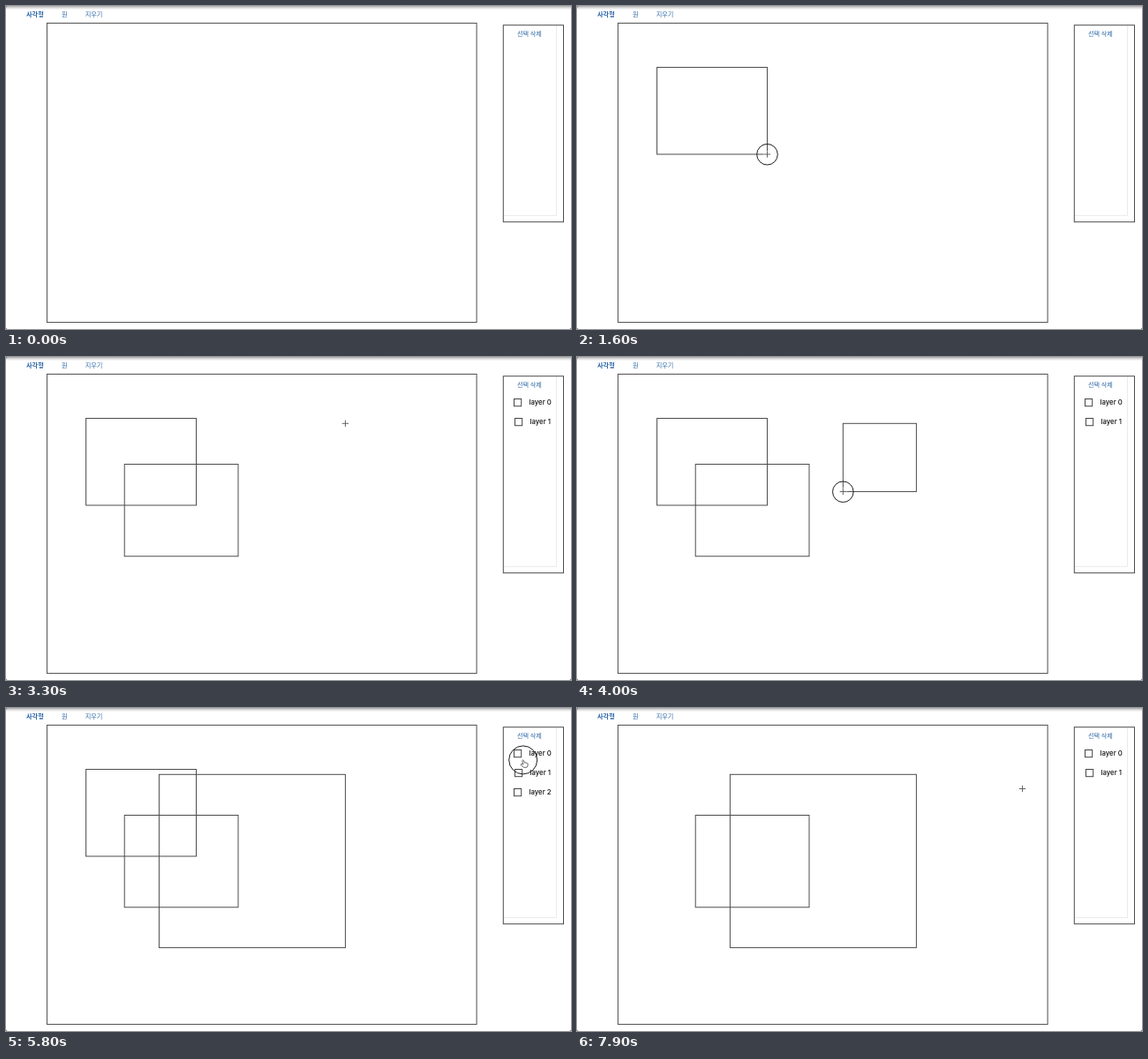
An HTML page that plays this animation: 640x366 px, repeating every 8000 ms.

```html
<!DOCTYPE html>
<html>
<head>
<meta charset="utf-8">
<title>Layer drawing</title>
<style>
html, body { margin: 0; width: 100%; height: 100%; overflow: hidden; background: #fff; }
svg { display: block; width: 640px; height: 366px; }
.ko { font: 400 7.15px "Noto Sans CJK KR", "Noto Sans CJK", sans-serif; fill: #2f69a6; }
.active { font-weight: 600; fill: #2460a4; }
.layer { font: 500 7.8px Inter, Roboto, sans-serif; fill: #111; }
.line { fill: none; stroke: #4c4c4c; }
.picked { stroke: #34345a; stroke-width: 1.6; }
.box { fill: none; stroke: #444; }
.ring { fill: none; stroke: #1c1c1c; }
.hand, .arrow { stroke-width: .8; stroke-linejoin: round; }
.hand { fill: #fff; stroke: #333; }
.arrow { fill: #111; stroke: #fff; }
</style>
</head>
<body>
<svg viewBox="0 0 640 366">
  <defs>
    <linearGradient id="shade" x2="0" y2="1">
      <stop stop-color="#a6a6a6"/><stop offset=".45" stop-color="#dedede"/><stop offset="1" stop-color="#fff"/>
    </linearGradient>
  </defs>
  <rect width="640" height="4.5" fill="url(#shade)"/>
  <path d="M0 364.5V366H1.5ZM640 364.5V366H638.5ZM0 0H1.5L0 2Z" fill="#777"/>
  <rect class="line" x="46.4" y="19.4" width="486.7" height="339"/>
  <path d="M623.5 22V237.5H563" fill="none" stroke="#ebebeb"/>
  <rect class="line" x="563.3" y="21.7" width="68.2" height="223"/>
  <rect id="hover" x="571" y="24" width="44" height="15" rx="2" fill="#1976d2" opacity="0"/>
  <text class="ko active" x="23" y="12">사각형</text>
  <text class="ko" x="63" y="12">원</text>
  <text class="ko" x="89.7" y="12">지우기</text>
  <text class="ko" x="579" y="33.6">선택 삭제</text>
  <g id="scene"></g>
</svg>
<script>
const LOOP = 8000, STEP = 100, TRAVEL = 350;
const CHECK = 6000, DELETE = 7000;
const scene = document.getElementById('scene');
const hover = document.getElementById('hover');

const moves = [], shapes = [], presses = [];
let spot = { x: 330, y: 385 };

function glide(from, to, x, y) {
  moves.push({ from, to, a: spot, b: { x, y } });
  spot = { x, y };
}

function press(from, to) {
  presses.push({ from, to });
}

// Travel to one corner, then drag to the opposite one
function dragBox(leave, down, arrive, release, a, b) {
  glide(leave, leave + TRAVEL, ...a);
  glide(down, arrive, ...b);
  press(down - 40, release);
  shapes.push({ a, b, down, arrive, release });
}

glide(100, 900, 36, 13);
dragBox(1050, 1400, 1600, 1700, [90.6, 69.5], [215.5, 168]);
dragBox(1800, 2250, 2700, 2900, [134.2, 225.8], [263, 121.5]);
dragBox(2900, 3700, 4400, 4600, [384.4, 75.3], [173.4, 271.6]);
glide(4700, 5400, 587, 53);
glide(5500, 5700, 585.7, 58.7);
press(5800, CHECK);
glide(6400, 6600, 591, 24);
press(6850, DELETE);
glide(7200, 7400, 475, 94);
glide(7400, 7600, 571, 80);
glide(7700, 7900, 504.5, 91.5);

function pointer(t) {
  const { from, to, a, b } = moves.filter(m => m.from <= t).pop() || moves[0];
  const u = Math.min(1, Math.max(0, (t - from) / (to - from)));
  const e = u * u * (3 - 2 * u);
  return [a.x + (b.x - a.x) * e, a.y + (b.y - a.y) * e];
}

function frame([x, y], [x2, y2], cls, shift = 0) {
  return `<rect class="${cls}" x="${Math.min(x, x2) + shift}" y="${Math.min(y, y2) + shift}"
    width="${Math.abs(x2 - x)}" height="${Math.abs(y2 - y)}"/>`;
}

function shape(s, t, at, checked) {
  if (t < s.down) return '';
  if (t < s.arrive) return frame(s.a, at, 'line');
  return checked ? frame(s.a, s.b, 'line picked', .9) : frame(s.a, s.b, 'line');
}

function layer(i, checked) {
  const x = 575.5 + i % 2, y = 47.5 + 22 * i;
  const mark = checked
    ? `<rect x="${x - .5}" y="${y - .5}" width="9" height="9" rx="1" fill="#1976d2"/>
       <path d="M${x + 1.5} ${y + 4}l2 2 3.6-3.8" fill="none" stroke="#fff" stroke-width="1.1"/>`
    : `<rect class="box" x="${x}" y="${y}" width="8.2" height="8.2"/>`;
  return mark + `<text class="layer" x="${x + 17}" y="${y + 6.6}">layer ${i}</text>`;
}

const overDelete = (x, y) => x > 572 && x < 615 && y > 22 && y < 39;

function cursor([x, y], count) {
  const at = `transform="translate(${x} ${y})"`;
  const overTool = y < 19 && x > 12 && x < 120;
  const overBox = Math.abs(x - 580) < 9 && y > 42 && y < 40 + 22 * count;
  if (x > 46 && x < 533 && y > 19 && y < 358)
    return `<g ${at} fill="none"><path d="M-4 0H4M0-4V4" stroke="#fff" stroke-width="2.4"/>
      <path d="M-3.7 0H3.7M0-3.7V3.7" stroke="#555" stroke-width=".9"/></g>`;
  if (overTool || overBox || overDelete(x, y))
    return `<path class="hand" transform="translate(${x} ${y + .3}) scale(.92)"
      d="M-1 .6Q0-.8 .9.6L2 3.6Q3 2.6 3.6 3.5Q4.6 2.9 5 4
      Q6 4 6 5.2L5.6 7.6 4.6 9H.6L-2.8 5.6Q-2.6 4.2-1.2 4.8L.1 5.4Z"/>`;
  return `<path class="arrow" ${at} d="M0 0V9.5L2.2 7.4 3.7 10.8 5.2 10.1 3.8 6.8H6.8Z"/>`;
}

// The ring shrinks quickly when the button goes down
function ring(t, [x, y]) {
  const p = presses.find(p => t >= p.from && t < p.to);
  if (!p) return '';
  const left = Math.max(0, 1 - (t - p.from) / 100);
  return `<circle class="ring" cx="${x}" cy="${y + .2}" r="${11.8 + 4.2 * left * left}"/>`;
}

function draw(t) {
  const at = pointer(t);
  const checked = t >= CHECK && t < DELETE;
  const kept = t < DELETE ? shapes : shapes.slice(1);
  const layers = kept.filter(s => t >= s.release);
  hover.setAttribute('opacity', overDelete(...at) ? .05 : 0);
  scene.innerHTML = kept.map((s, i) => shape(s, t, at, checked && i === 0)).join('')
    + layers.map((s, i) => layer(i, checked && i === 0)).join('')
    + cursor(at, layers.length) + ring(t, at);
}

let last = -1;
function tick() {
  const t = Math.floor(performance.now() % LOOP / STEP) * STEP;
  if (t !== last) draw(last = t);
  requestAnimationFrame(tick);
}
tick();
</script>
</body>
</html>
```
